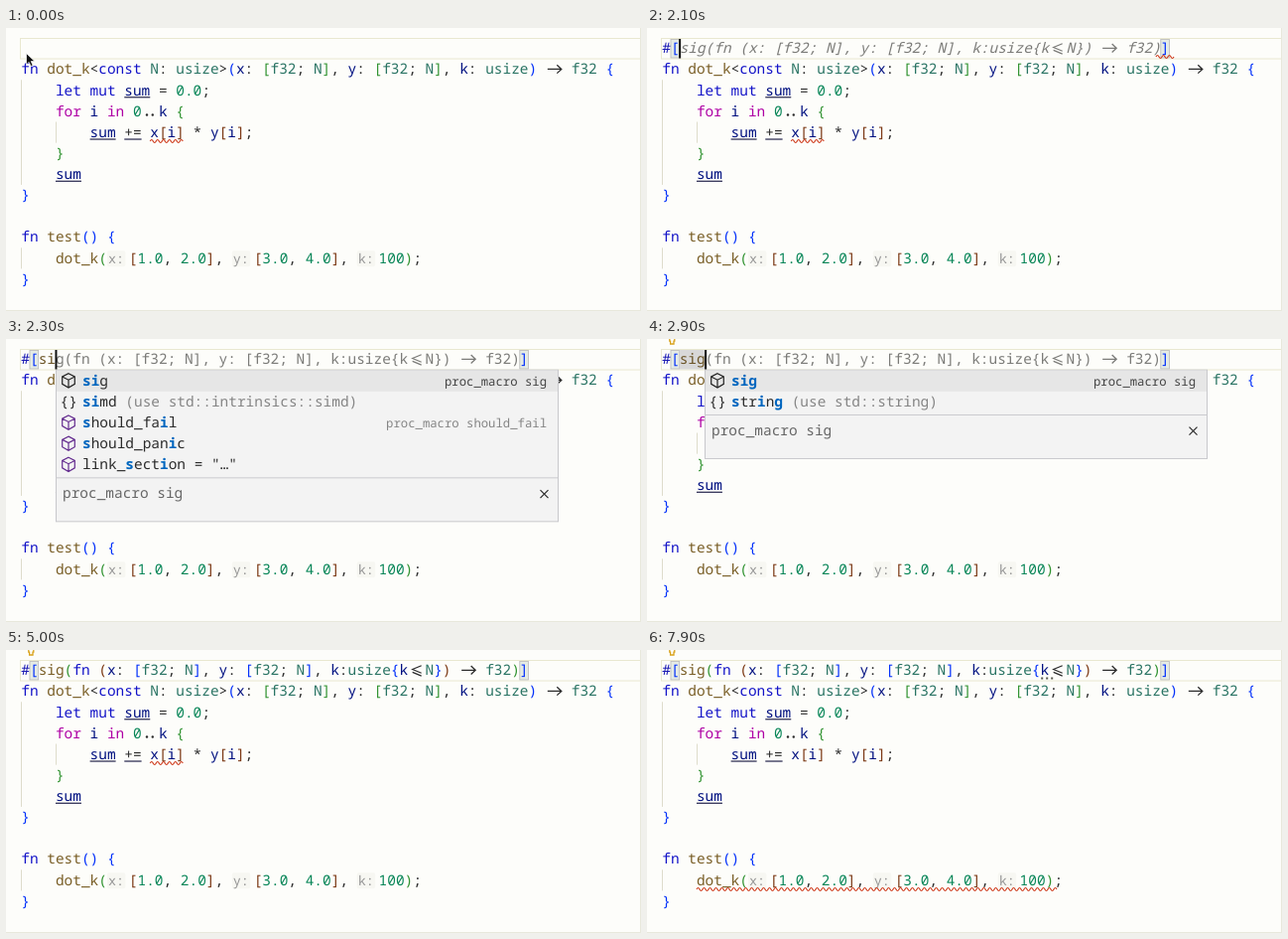
These frames come from a looping animation (640x285 px, 8 s). An HTML page:

```html
<!DOCTYPE html>
<html lang="en">
<head>
<meta charset="utf-8">
<title>Editor session</title>
<style>
  html, body { margin: 0; height: 100%; overflow: hidden; background: #fdfdfa; }
  svg { display: block; width: 100vw; height: 100vh; }
  text {
    font: 14.44px "Noto Sans Mono", "DejaVu Sans Mono", monospace;
    white-space: pre;
    text-rendering: geometricPrecision;
  }
  .italic text { font-style: italic; }
  text.small { font-size: 12.27px; }
  text.hint { font-size: 13.4px; }
  .match { font-weight: 700; fill: #0066bf; }
</style>
</head>
<body>
<svg id="stage" viewBox="0 0 640 285"></svg>
<script>
const LOOP = 8000, CHAR = 8.664, ROW = 21.13, LEFT = 15.3, TOP = 10;
const INK = '#2b2b2b', GRAY = '#7b7b78', RED = '#cf3a1c';
const BRACKETS = ['#0431fa', '#319331', '#7b3814'];
const TOKEN = /->|<=|\.\.|[()[\]{}]|\d+(\.\d+)?|\w+| +|[^\w\s()[\]{}]/g;
const WORDS = [
  [/^(fn|const|let|mut)$/, '#1414c8'],
  [/^(for|in)$/, '#af00a5'],
  [/^(f32|usize|N)$/, '#2a7464'],
  [/^(dot_k|test|sig)$/, '#795e26'],
  [/^\d/, '#098658'],
  [/^\w/, '#001080']
];
const SIGNATURE = 'sig(fn (x: [f32; N], y: [f32; N], k:usize{k<=N}) -> f32)';
const END = 2 + SIGNATURE.length;

// Moments of the session in ms
const HASH = 600, BRACKET = 1000, GHOST = 1300, ERROR = 1700;
const TYPE_S = 2200, TYPE_I = 2300, TYPE_G = 2500, BULB = 2800, ACCEPT = 3100, CHECKED = 6900;

const stage = document.getElementById('stage');
const timed = [];
const xAt = col => LEFT + col * CHAR;
const topOf = row => TOP + row * ROW;
const baseOf = row => topOf(row) + 15.3;

function add(parent, tag, attrs, content = '') {
  const el = document.createElementNS('http://www.w3.org/2000/svg', tag);
  for (const key in attrs) el.setAttribute(key, attrs[key]);
  el.textContent = content;
  return parent.appendChild(el);
}
const group = (attrs = {}) => add(stage, 'g', attrs);
const text = (parent, x, y, s, fill, more) => add(parent, 'text', { x, y, fill, ...more }, s);
const rect = (parent, x, y, width, height, fill, more) =>
  add(parent, 'rect', { x, y, width, height, fill, ...more });
const line = (parent, d, stroke, width = 1) =>
  add(parent, 'path', { d, stroke, 'stroke-width': width, fill: 'none' });

function show(el, from, to = LOOP) {
  timed.push({ el, from, to });
  return el;
}

// Operators that the editor joins into one double-width sign
function ligature(parent, sign, x, y, color) {
  if (sign === '->') line(parent, `M${x + 2} ${y - 5}h14m-4.5-4.2l4.5 4.2l-4.5 4.2`, color, 1.3);
  else if (sign === '<=') line(parent, `M${x + 13.5} ${y - 9.5}l-9 3.7l9 3.7m-9-.8l9 3.7`, color, 1.2);
  else [5.4, 11.2].forEach(dx => add(parent, 'circle', { cx: x + dx, cy: y - 1.2, r: 1.2, fill: color }));
}

let depth = 0;
function tokenColor(token) {
  if ('([{'.includes(token)) return BRACKETS[depth++ % 3];
  if (')]}'.includes(token)) return BRACKETS[--depth % 3];
  const rule = WORDS.find(([test]) => test.test(token));
  return rule ? rule[1] : INK;
}

function code(parent, row, col, src, color) {
  const y = baseOf(row);
  for (const token of src.match(TOKEN)) {
    const fill = color || tokenColor(token), x = xAt(col);
    if (/^(->|<=|\.\.)$/.test(token)) ligature(parent, token, x, y, fill);
    else if (token.trim()) text(parent, x, y, token, fill);
    col += token.length;
  }
}

function squiggle(parent, x1, x2, y) {
  let d = `M${x1} ${y + 1.5}q1.5-3 3 0`;
  for (let x = x1 + 3; x < x2 - 2; x += 3) d += 't3 0';
  return line(parent, d, RED, 1.2);
}

// Frame of the editor, current line and indent guides
const base = group();
rect(base, 14.5, 10.5, 640, 20.5, 'none', { stroke: '#e9e8d0' });
line(base, 'M0 284.5H640M639.5 0V285', '#e8e8dc');
line(base, `M15.5 ${topOf(2)}V${topOf(7)}M50.5 ${topOf(4)}V${topOf(5)}M15.5 ${topOf(10)}V${topOf(11)}`, '#dedccb');

// Function body
[
  [1, 0, 'fn dot_k<const N: usize>(x: [f32; N], y: [f32; N], k: usize) -> f32 {'],
  [2, 4, 'let mut sum = 0.0;'],
  [3, 4, 'for i in 0..k {'],
  [4, 8, 'sum += x[i] * y[i];'],
  [5, 4, '}'],
  [6, 4, 'sum'],
  [7, 0, '}'],
  [9, 0, 'fn test() {']
].forEach(([row, col, src]) => code(base, row, col, src));

[[2, 12, 3], [4, 8, 3], [4, 12, 2], [6, 4, 3]].forEach(([row, col, n]) =>
  line(base, `M${xAt(col)} ${topOf(row) + 17.5}h${n * CHAR}`, '#22224a', 1.2));

// Call with parameter hints between the arguments
let callCol = 4;
code(base, 10, callCol, 'dot_k(');
callCol += 6;
[['x:', '[1.0, 2.0], '], ['y:', '[3.0, 4.0], '], ['k:', '100);']].forEach(([hint, arg]) => {
  const x = xAt(callCol);
  rect(base, x, topOf(10) + 3, 18.5, 16, '#f7f7f2', { rx: 2 });
  text(base, x + 1, baseOf(10), hint, '#969696', { class: 'hint' });
  callCol += 21.9 / CHAR;
  code(base, 10, callCol, arg);
  callCol += arg.length;
});
code(base, 11, 0, '}');

// Attribute line
function bracketBox(from, to, col) {
  show(rect(stage, xAt(col), 11.5, CHAR, 18.5, '#e5ebe4', { stroke: '#b9b9b9', 'stroke-width': .8 }), from, to);
}
bracketBox(BRACKET, LOOP, 1);
bracketBox(BRACKET, GHOST, 2);
bracketBox(GHOST, LOOP, END);
show(rect(stage, xAt(2), 11, 3 * CHAR, 19.5, '#d8d8d8'), BULB, ACCEPT);

function attr(from, to, col, src, color, className = '') {
  code(show(group({ class: className }), from, to), 0, col, src, color);
}
attr(HASH, LOOP, 0, '#', '#1a1ab4');
attr(BRACKET, LOOP, 1, '[', BRACKETS[0]);
attr(BRACKET, GHOST, 2, ']', BRACKETS[0]);
attr(GHOST, LOOP, END, ']', BRACKETS[0]);
attr(GHOST, TYPE_S, 2, SIGNATURE, GRAY, 'italic');
[TYPE_S, TYPE_I, TYPE_G, ACCEPT].slice(0, 3).forEach((from, i, starts) => {
  const to = starts[i + 1] || ACCEPT, typed = i + 1;
  attr(from, to, 2, SIGNATURE.slice(0, typed), '#6b5426');
  attr(from, to, 2 + typed, SIGNATURE.slice(typed), GRAY);
});
depth = 1;
attr(ACCEPT, LOOP, 2, SIGNATURE);

// Diagnostics
show(squiggle(stage, 513, 531, 27.5), ERROR, TYPE_S);
show(squiggle(stage, xAt(15), xAt(19), 112.5), 0, CHECKED);
show(squiggle(stage, 50, 413, 239.5), CHECKED);
const dots = show(group(), CHECKED);
[398, 403, 408].forEach(x => rect(dots, x - .8, 27.5, 2, 2, '#55554a'));

// Light bulb
const bulb = show(group(), BULB);
line(bulb, 'M22.8 0v2.2h.8V5h3.4V2.2h.8V0', '#d9a21b', 1.3);

// Suggestion list: matched letters stand between asterisks
const FIRST = [
  ['*si*g', '', 'proc_macro sig'],
  ['*si*md', ' (use std::intrinsics::simd)', ''],
  ['*s*hould_fa*i*l', '', 'proc_macro should_fail'],
  ['*s*hould_pan*i*c', '', ''],
  ['link_*s*ect*i*on = "…"', '', '']
];
const NARROWED = [
  ['*sig*', '', 'proc_macro sig'],
  ['*s*tr*i*n*g*', ' (use std::string)', '']
];

function popup(x, items, from, to) {
  const g = show(group(), from, to);
  const y0 = 31.2, width = 506, listEnd = y0 + items.length * ROW;
  rect(g, x + .5, y0, width, listEnd - y0 + 47, '#f3f3f3', { stroke: '#c8c8cc' });
  rect(g, x + 1, y0 + .5, width - 1, ROW, '#e6e6e6');
  items.forEach(([label, extra, right], i) => {
    const mid = y0 + (i + .5) * ROW, y = mid + 5;
    if (extra) text(g, x + 4.5, y, '{}', INK);
    else line(g, `M${x + 13} ${mid - 7}l6.3 3.2v7.4l-6.3 3.6l-6.3-3.6v-7.4zm-6.3 3.2l6.3 3.2l6.3-3.2m-6.3 3.2v7.8`,
      i ? '#652d90' : '#222222', 1.2);
    const row = text(g, x + 27, y, '', INK);
    label.split('*').forEach((part, n) => add(row, 'tspan', n % 2 ? { class: 'match' } : {}, part));
    add(row, 'tspan', { fill: '#858585' }, extra);
    text(g, x + width - 11, y, right, i ? '#858585' : '#444444', { class: 'small', 'text-anchor': 'end' });
  });
  line(g, `M${x} ${listEnd + 3}h${width}`, '#cacace');
  text(g, x + 7, listEnd + 23.5, 'proc_macro sig', '#666666');
  line(g, `M${x + 488.5} ${listEnd + 15.2}l8 8m0-8l-8 8`, INK, 1.2);
}
popup(42, FIRST, TYPE_S, TYPE_I);
popup(50, FIRST, TYPE_I, TYPE_G);
popup(58, NARROWED, TYPE_G, ACCEPT);

// Mouse pointer
show(add(stage, 'path', {
  d: 'M20.5 25.5V36.8l2.7-2.4l1.9 4.1l2-.9l-1.9-4h3.7z',
  fill: '#111', stroke: '#fff', 'stroke-width': .7
}), 0, 100);

// Text cursor: restarts its blink at every key press
const KEYS = [[HASH, 1], [BRACKET, 2], [TYPE_S, 3], [TYPE_I, 4], [TYPE_G, 5], [ACCEPT, END]];
const caret = rect(stage, 0, 11, 2, 19.5, '#111');

function draw() {
  const t = performance.now() % LOOP;
  for (const { el, from, to } of timed) el.style.display = t >= from && t < to ? '' : 'none';
  const key = KEYS.filter(([at]) => at <= t).pop();
  const lit = key && (t - key[0]) % 1000 < 500;
  caret.style.display = lit ? '' : 'none';
  if (lit) caret.setAttribute('x', xAt(key[1]) - .5);
  requestAnimationFrame(draw);
}
draw();
</script>
</body>
</html>
```
